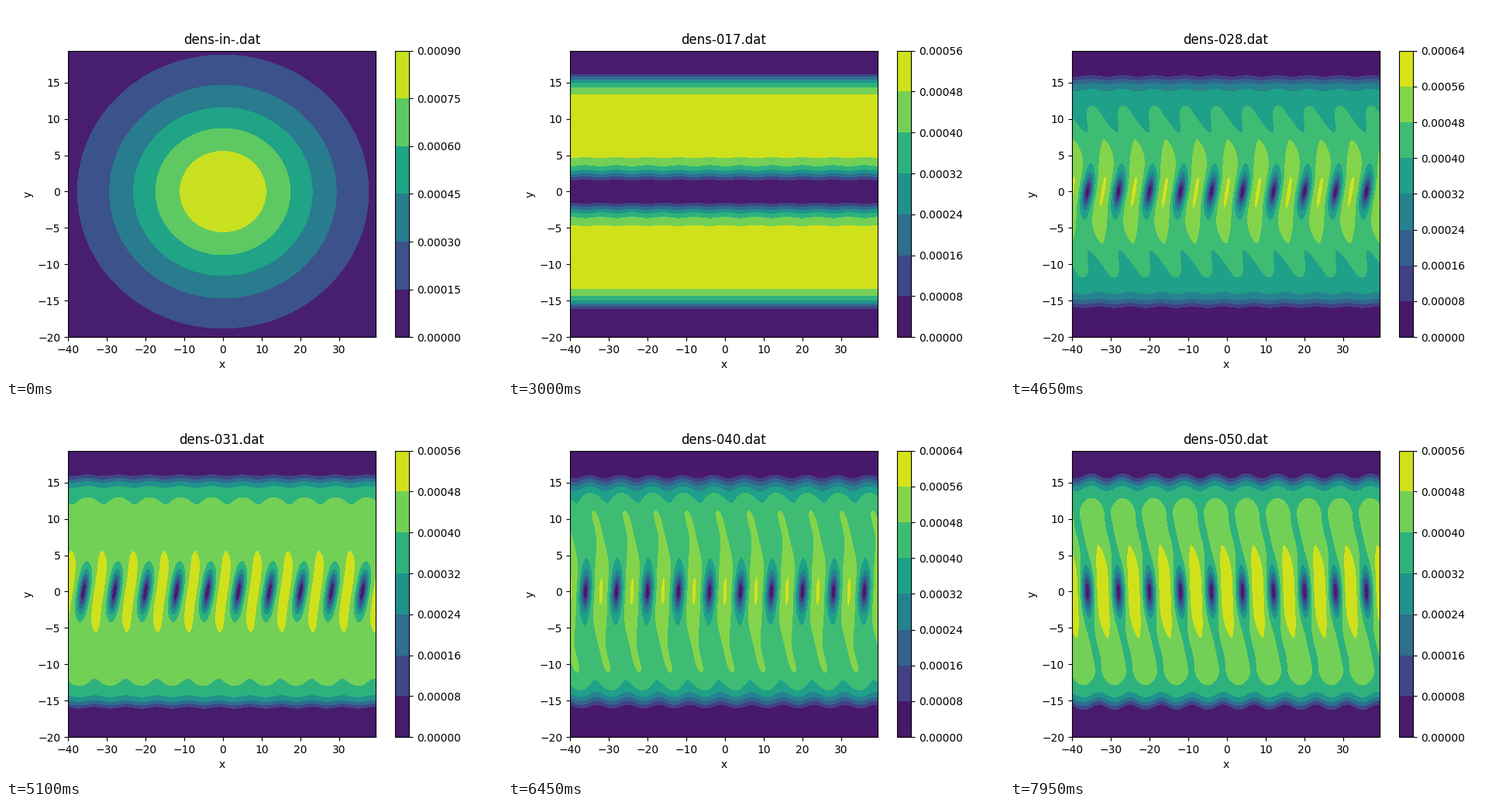
Animation of 640 by 480 pixels, one loop 8000 ms. Source, as a matplotlib script:

```python
import numpy as np
import matplotlib.pyplot as plt
from matplotlib.animation import FuncAnimation

STEP_MS, TICK_MS, LOOP_MS = 150, 50, 8000
PERIOD = 8.0
K = 2 * np.pi / PERIOD
UNIT = 1e-3

x = np.linspace(-40, 39.375, 319)
y = np.linspace(-20, 19.375, 253)
X, Y = np.meshgrid(x, y)
R = np.abs(Y)


def healing(distance, width):
    """Density growing from a wall into the fluid."""
    return np.tanh(np.maximum(distance, 0) / width) ** 2


def stripes(gap, gap_width, wall_width, ripple):
    """Two flat bands with an empty channel between them."""
    inner = healing(R - gap + ripple * np.cos(K * X), gap_width)
    return .53 * inner * healing(16.93 - R, wall_width)


def street(base, bell, height, core, stretch, tilt, bend, wave, ring,
           wobble, wall_width, spread=4, power=1):
    """A row of vortices along y = 0 with sheared waves around it."""
    moved = X - 3 * np.tanh((tilt * Y - bend * Y ** 3) / 3)
    crest = np.cos(K * moved)
    across = moved % PERIOD - PERIOD / 2
    along = (R / stretch) ** power * (1 + (Y / 12) ** 6)
    r2 = across ** 2 + along ** 2
    level = base + bell * np.exp(-(Y / height) ** 2)
    level = level + wave * crest * np.exp(-((R - ring) / spread) ** 2)
    edge = healing(16.75 + wobble * crest - R, wall_width)
    return np.maximum(level, 0) * edge * r2 / (r2 + core)


cloud = .874 * np.exp(-X ** 2 / 800 - Y ** 2 / 200)
early = stripes(1.33, 1.95, 1.8, 0)
late = stripes(.75, 2.15, 1.97, .08)
tilted = street(base=.36, bell=.28, height=8, core=1.9, stretch=1.9,
                tilt=.3, bend=.0053, wave=.028, ring=9, wobble=.08,
                wall_width=1.75)
spotted = street(base=.445, bell=.06, height=9, core=1.5, stretch=2.67,
                 tilt=.28, bend=.0035, wave=-.033, ring=7.2, wobble=.15,
                 wall_width=1.65, spread=2.2, power=1.757)
wavy = street(base=.46, bell=.18, height=6, core=1.9, stretch=2.1,
              tilt=.1, bend=.0025, wave=.036, ring=10, wobble=.25,
              wall_width=2.2)
upright = street(base=.41, bell=.21, height=7, core=2, stretch=2.3,
                 tilt=-.06, bend=.0037, wave=.022, ring=8, wobble=.35,
                 wall_width=1.9)

# (time index, field, easing power of the approach to that field)
KEYS = [(-1, early, 1), (4, early, 1), (17, late, 2), (25, tilted, 1.5),
        (28, tilted, 1), (35, spotted, 1), (40, wavy, 1), (50, upright, 2)]


def density(index):
    for (t0, start, _), (t1, end, power) in zip(KEYS, KEYS[1:]):
        if index <= t1:
            mix = ((index - t0) / (t1 - t0)) ** power
            return start + (end - start) * mix


def scene(step):
    if step == 0:
        return "in-", cloud, np.arange(7) * .15
    index = step - 2
    field = density(index)
    count = 9 if field.max() > .56 else 8
    return ("im-" if index < 0 else f"{index:03d}"), field, np.arange(count) * .08


fig = plt.figure(figsize=(6.4, 4.8), dpi=100)
ax = fig.add_axes([.125, .11, .62, .77])
cax = fig.add_axes([501.6 / 640, .11, 18.48 / 640, .77])
ax.set(xlabel="x", ylabel="y", xlim=(x[0], x[-1]), ylim=(y[0], y[-1]))
shown = {"step": None, "top": None, "fill": None}


def update(tick):
    step = max(0, tick * TICK_MS // STEP_MS - 1)
    if step == shown["step"]:
        return
    name, field, levels = scene(step)
    if shown["fill"] is not None:
        shown["fill"].remove()
    fill = ax.contourf(x, y, field * UNIT, levels=levels * UNIT, cmap="viridis")
    ax.set_title(f"dens-{name}.dat")
    if levels[-1] != shown["top"]:
        cax.clear()
        cax.set_axes_locator(None)
        fig.colorbar(fill, cax=cax, format="%.5f", ticks=levels * UNIT)
    shown.update(step=step, top=levels[-1], fill=fill)


def init():
    shown.update(step=None, top=None)
    update(0)


anim = FuncAnimation(fig, update, frames=LOOP_MS // TICK_MS, interval=TICK_MS,
                     init_func=init, repeat=True, repeat_delay=0, blit=False)
plt.show()
```
